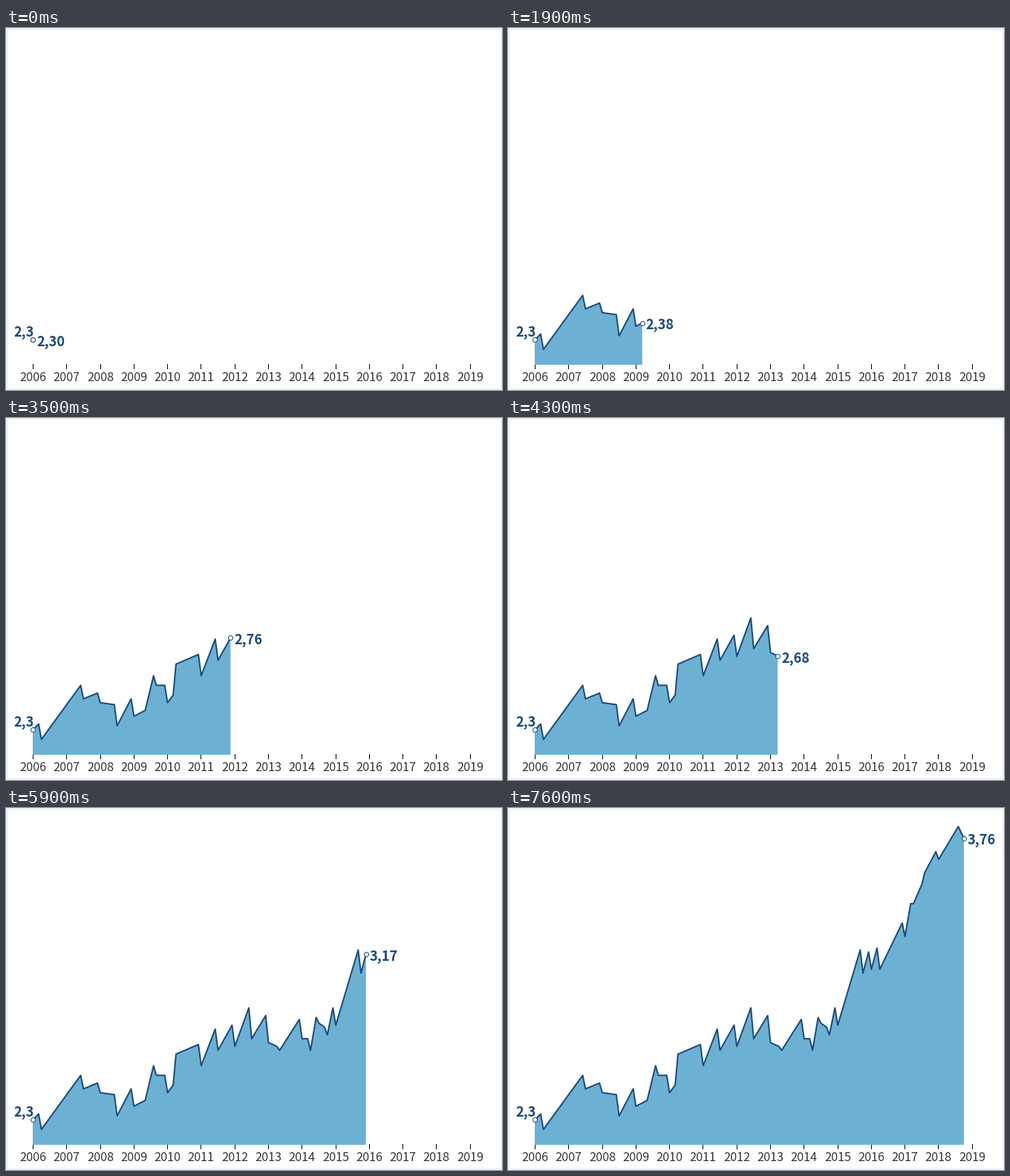
These frames come from a looping animation (668x488 px, 7700 ms). A matplotlib script:

```python
import numpy as np
import matplotlib.pyplot as plt
from matplotlib.animation import FuncAnimation
from matplotlib.patches import Polygon, Rectangle

W, H, DPI = 668, 488, 100
FRAMES, INTERVAL = 77, 100
PX = 72 / DPI                      # one pixel in points
FONT = "Noto Sans CJK JP"
NAVY, BLUE, FRAME, GREY = "#1b4a7a", "#6cb1d4", "#eff4f7", "#333333"
LEFT, BASE = 36, 454
X0, YEAR = 36.4, 45.3

# The curve runs straight between sudden steps, each one month long:
# month of the step, value before, value after.
START, END, LAST = 2.30, 3.76, 153
STEPS = [
    (2, 2.33, 2.25), (17, 2.53, 2.46), (23, 2.49, 2.44), (29, 2.43, 2.32),
    (35, 2.46, 2.37), (40, 2.40, 2.46), (43, 2.58, 2.53), (47, 2.53, 2.44),
    (50, 2.48, 2.64), (59, 2.69, 2.58), (65, 2.77, 2.66), (71, 2.79, 2.68),
    (77, 2.88, 2.72), (83, 2.84, 2.70), (87, 2.68, 2.66), (95, 2.82, 2.72),
    (98, 2.72, 2.66), (101, 2.83, 2.80), (104, 2.78, 2.74),
    (107, 2.88, 2.79), (116, 3.18, 3.06), (119, 3.17, 3.08),
    (122, 3.19, 3.08), (131, 3.32, 3.25), (134, 3.42, 3.42),
    (138, 3.52, 3.58), (143, 3.69, 3.65), (151, 3.82, 3.79),
]
knots = [(0, START), (LAST, END)]
for m, before, after in STEPS:
    knots += [(m, before), (m + 1, after)]
knot_m, knot_v = zip(*sorted(knots))
months = np.arange(LAST + 1)


def value_at(month):
    return np.interp(month, knot_m, knot_v)


def x_at(month):
    return X0 + month * YEAR / 12


def y_at(month):
    return 420.2 - (value_at(month) - START) * 260


def comma(v, digits):
    return f"{v:.{digits}f}".replace(".", ",")


fig = plt.figure(figsize=(W / DPI, H / DPI), dpi=DPI, facecolor=FRAME)
ax = fig.add_axes([0, 0, 1, 1])
ax.set_xlim(0, W)
ax.set_ylim(H, 0)
ax.axis("off")
ax.add_patch(Rectangle((3, 3), 663, 482, fc="white", lw=0))

for k in range(14):
    x = np.floor(X0 + k * YEAR)
    ax.add_patch(Rectangle((x, 453), 1, 7, fc="black", lw=0))
    ax.text(x + 0.5, 476, str(2006 + k), ha="center", va="baseline",
            family=FONT, size=16.3 * PX, color=GREY)

area = ax.add_patch(Polygon([(LEFT, BASE)] * 3, fc=BLUE, lw=0, zorder=2))
line, = ax.plot([], [], color=NAVY, lw=2 * PX, solid_joinstyle="round",
                solid_capstyle="butt", zorder=3)


def dot(z):
    return ax.plot([X0], [y_at(0)], "o", ms=6 * PX, mfc="white",
                   mec=NAVY, mew=PX, zorder=z)[0]


def big_text(x, y, s, ha):
    return ax.text(x, y, s, ha=ha, va="baseline", family=FONT, weight="bold",
                   size=18.2 * PX, color=NAVY, zorder=6)


start, head = dot(4), dot(5)
big_text(38, 416, comma(START, 1), "right")
label = big_text(0, 0, "", "left")


def update(i):
    t = i * LAST / (FRAMES - 1)
    m = np.append(months[months < t], t)
    xs, ys = x_at(m), y_at(m)
    line.set_data(xs, ys)
    area.set_xy([(LEFT, BASE), (LEFT, ys[0]), *zip(xs, ys), (xs[-1], BASE)])
    head.set_data([xs[-1]], [ys[-1]])
    label.set_position((xs[-1] + 5, ys[-1] + 8.7))
    label.set_text(comma(value_at(round(t)), 2))
    return area, line, head, label


anim = FuncAnimation(fig, update, frames=FRAMES, interval=INTERVAL,
                     repeat=True, repeat_delay=0)
plt.show()
```
